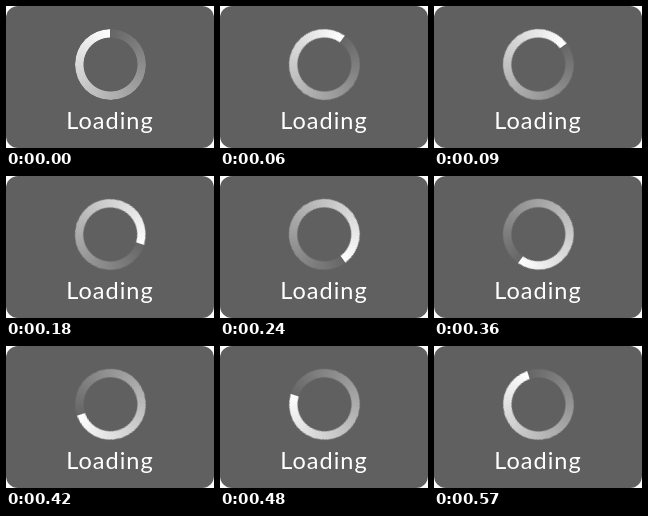
Recreate the animation shown at these times as an HTML page. Size 208x142 px, loop 600 ms.

```html
<!DOCTYPE html>
<html lang="en">
<head>
<meta charset="utf-8">
<title>Loading</title>
<style>
  html, body {
    margin: 0;
    width: 100%;
    height: 100%;
    overflow: hidden;
    background: #fff;
  }
  svg {
    display: block;
  }
  .panel {
    position: absolute;
    inset: 0;
    overflow: hidden;
    border-radius: 12px;
    background: #606060;
  }
  .ring {
    position: absolute;
    left: 68.6px;
    top: 22.6px;
    width: 70.8px;
    height: 70.8px;
    border-radius: 50%;
    background: conic-gradient(rgba(255, 255, 255, 0.04), #fff);
    -webkit-mask: radial-gradient(circle, transparent 26.6px, #000 27.4px);
    mask: radial-gradient(circle, transparent 26.6px, #000 27.4px);
    animation: spin 600ms steps(20) infinite;
  }
  text {
    font: 400 23.5px Lato, sans-serif;
    letter-spacing: 1px;
    fill: #fff;
    text-anchor: middle;
  }
  @keyframes spin {
    to { transform: rotate(360deg); }
  }
</style>
</head>
<body>
<div class="panel">
  <div class="ring"></div>
  <svg width="208" height="142"><text x="104" y="123">Loading</text></svg>
</div>
</body>
</html>
```
